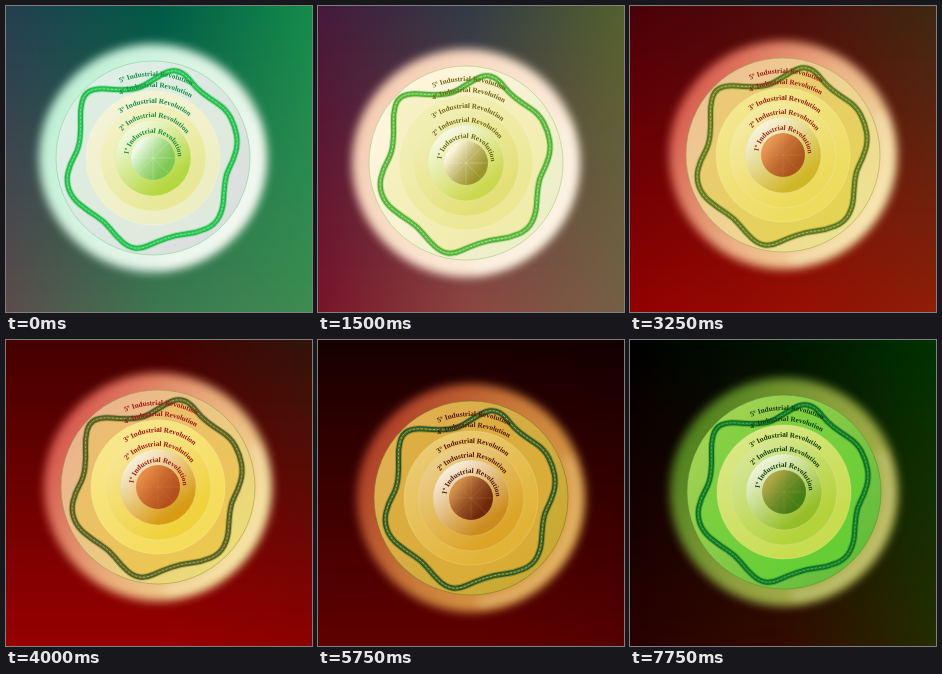
An HTML page with a canvas for the animation above (8 s loop, 306 by 306 pixels).

```html
<!DOCTYPE html>
<html lang="en">
<head>
<meta charset="utf-8">
<title>Industrial revolutions</title>
<style>
  html, body { margin: 0; width: 100%; height: 100%; overflow: hidden; background: #000; }
  canvas { display: block; width: 306px; height: 306px; }
</style>
</head>
<body>
<canvas id="stage" width="306" height="306"></canvas>
<script>
const ctx = document.getElementById('stage').getContext('2d');
const SIZE = 306, LOOP = 8000, STEP = 250, TAU = Math.PI * 2;

// Time, centre, then colours in the order of FIELDS.
const FIELDS = ['tl', 'tc', 'tr', 'bl', 'bc', 'br', 'haloA', 'haloB', 'discA', 'discB', 'wave',
  'ring3', 'ring2', 'ring1', 'ballA', 'ballB', 'road', 'dash', 'text'];
const KEYS = [
  [0, 147, 152, '243f50 005a46 148c4b 5a4b4b 3c7850 3c8c50 c0f0d6 f0f7ee def0e6 dcdfde dfe9dc eeeec4 e8e898 b4d840 eefae6 7cc850 1eb84a 6af08c 148c46'],
  [1500, 148, 157, '46193a 323c46 55602d 78142a 8c4640 735f46 f5cdb4 fdf2e0 fff5dc ecefc8 f0ecaa ece896 e4e078 ccd850 fff5dc 9c942c 50aa32 9cf088 6e6414'],
  [2500, 154, 151, '50000f 551914 4b3c19 8c0000 961905 8c3c0f d86452 fae6b4 f0d296 f0e6aa dede5a e6dc64 ebe178 c8d23c eca264 a05a1e 5a8c14 c8c468 8c2814'],
  [4000, 152, 147, '460000 460000 32140a 960000 960000 8c0000 d75a50 f5e196 ebb48c ebdc78 ebc850 f5dc5a f0d23c d79b14 e68c46 b4501e 4b5a1e b4a050 a01414'],
  [5750, 153, 158, '190000 190000 140000 5f0000 5f0000 550000 b04028 dca546 e1af50 c8aa32 d8ac34 e1b437 dca528 cd8c1e d2904a 6e280a 23501e b0aa4c 501405'],
  [7000, 158, 145, '020202 020202 002805 320000 280500 141900 786e28 c8be5a b4b43c 78be28 a8c02c d2be3c c8b428 aaa01e c8ac64 5a5a14 0a7828 50c864 281e05'],
  [7750, 154, 152, '000000 001400 003200 280000 320a00 232d00 50821e b4b450 a0d250 64be3c 64ce34 c8dc50 b4d23c 96be28 b0a848 467d14 0a6e1e 46b450 0f3c0a']
].map(([t, x, y, list]) => ({
  t, x, y,
  colors: list.split(' ').map(h => [0, 2, 4].map(i => parseInt(h.substr(i, 2), 16)))
}));

// Wavy road, relative to the centre.
const WAVE = [[13, -86], [23, -88], [33, -83], [43, -70], [56, -60], [73, -49], [82, -32], [85, -14],
  [80, 3], [73, 16], [71, 33], [70, 51], [62, 67], [43, 75], [23, 77], [3, 84], [-12, 91], [-25, 89],
  [-37, 78], [-49, 63], [-65, 53], [-81, 40], [-87, 23], [-83, 6], [-74, -10], [-72, -30], [-73, -48],
  [-69, -64], [-57, -70], [-35, -68], [-15, -69], [0, -78]];

const LABELS = [[27, '1º'], [43, '2º'], [57, '3º'], [73, '4º'], [84, '5º']];

const lerp = (a, b, k) => a + (b - a) * k;
const mix = (a, b, k) => a.map((v, i) => lerp(v, b[i], k));
const css = (c, alpha = 1) => `rgba(${c.map(Math.round).join()},${alpha})`;
const WHITE = [255, 255, 255];

function stateAt(t) {
  let i = 0;
  while (i < KEYS.length - 2 && t >= KEYS[i + 1].t) i++;
  const a = KEYS[i], b = KEYS[i + 1];
  const k = Math.min(1, (t - a.t) / (b.t - a.t));
  const s = { x: lerp(a.x, b.x, k), y: lerp(a.y, b.y, k) };
  FIELDS.forEach((name, n) => s[name] = mix(a.colors[n], b.colors[n], k));
  return s;
}

function gradient(x0, y0, x1, y1, ...colors) {
  const g = ctx.createLinearGradient(x0, y0, x1, y1);
  colors.forEach((c, i) => g.addColorStop(i / (colors.length - 1), css(c)));
  return g;
}

function circle(r, fill) {
  ctx.beginPath();
  ctx.arc(0, 0, r, 0, TAU);
  ctx.fillStyle = fill;
  ctx.fill();
}

function strokeCircle(r, color, width) {
  ctx.beginPath();
  ctx.arc(0, 0, r, 0, TAU);
  ctx.strokeStyle = color;
  ctx.lineWidth = width;
  ctx.stroke();
}

function backdrop(s) {
  const h = 9;
  for (let y = 0; y < SIZE; y += h) {
    const k = y / (SIZE - h);
    ctx.fillStyle = gradient(0, 0, SIZE, 0, mix(s.tl, s.bl, k), mix(s.tc, s.bc, k), mix(s.tr, s.br, k));
    ctx.fillRect(0, y, SIZE, h);
  }
}

function disc(s) {
  ctx.filter = 'blur(5px)';
  circle(114, gradient(-95, -55, 95, 55, s.haloA, mix(s.haloA, s.haloB, .6), s.haloB));
  // Bright rim at the lower right
  ctx.beginPath();
  ctx.arc(0, 0, 105, -.4, 1.5);
  ctx.strokeStyle = css(mix(s.haloB, WHITE, .5), .6);
  ctx.lineWidth = 6;
  ctx.stroke();
  ctx.filter = 'none';
  circle(97, gradient(-70, -60, 70, 60, s.discA, s.discB));
  strokeCircle(97, css(mix(s.road, s.haloB, .45), .7), .8);
}

function wavePath() {
  const n = WAVE.length, mid = (a, b) => [(a[0] + b[0]) / 2, (a[1] + b[1]) / 2];
  ctx.beginPath();
  ctx.moveTo(...mid(WAVE[n - 1], WAVE[0]));
  WAVE.forEach((p, i) => ctx.quadraticCurveTo(...p, ...mid(p, WAVE[(i + 1) % n])));
  ctx.closePath();
}

function rings(s) {
  wavePath();
  ctx.fillStyle = gradient(-60, -70, 50, 60, mix(s.wave, s.discA, .6), s.wave);
  ctx.fill();
  [[67, s.ring3, .3], [53, s.ring2, .45], [38, s.ring1, .85]].forEach(([r, c, light]) => {
    circle(r, gradient(-r * .6, -r * .8, r * .5, r * .6, mix(c, WHITE, light), mix(c, WHITE, light * .5), c));
    strokeCircle(r, css(mix(c, WHITE, .5), .45), .8);
  });
  circle(22, gradient(-15, -11, 13, 10, s.ballA, mix(s.ballA, s.ballB, .6), s.ballB));
  ctx.strokeStyle = css(s.ballA, .35);
  ctx.lineWidth = .6;
  for (let i = 0; i < 8; i++) {
    const a = i * TAU / 8;
    ctx.beginPath();
    ctx.moveTo(0, 0);
    ctx.lineTo(22 * Math.cos(a), 22 * Math.sin(a));
    ctx.stroke();
  }
}

function road(s) {
  wavePath();
  ctx.lineJoin = 'round';
  [[7, s.road, .3], [5, s.road, 1], [3, mix(s.road, s.dash, .25), 1]].forEach(([w, c, alpha]) => {
    ctx.lineWidth = w;
    ctx.strokeStyle = css(c, alpha);
    ctx.stroke();
  });
  ctx.setLineDash([2.5, 1.5]);
  ctx.lineWidth = 1;
  ctx.strokeStyle = css(s.dash);
  ctx.stroke();
  ctx.setLineDash([]);
}

function arcText(text, r) {
  const width = ctx.measureText(text).width;
  let x = -width / 2;
  for (const ch of text) {
    const w = ctx.measureText(ch).width;
    ctx.save();
    ctx.rotate((x + w / 2) / r + .04);
    ctx.fillText(ch, -w / 2, -r);
    ctx.restore();
    x += w;
  }
}

function draw(t) {
  const s = stateAt(t);
  backdrop(s);
  ctx.save();
  ctx.translate(s.x, s.y);
  disc(s);
  rings(s);
  road(s);
  ctx.font = 'bold 7.2px "Liberation Serif", serif';
  ctx.fillStyle = css(s.text);
  LABELS.forEach(([r, n]) => arcText(n + ' Industrial Revolution', r - 2));
  ctx.restore();
}

const start = performance.now();
let shown = -1;
function tick() {
  const t = Math.floor((performance.now() - start) % LOOP / STEP) * STEP;
  if (t !== shown) draw(shown = t);
  requestAnimationFrame(tick);
}
tick();
</script>
</body>
</html>
```
